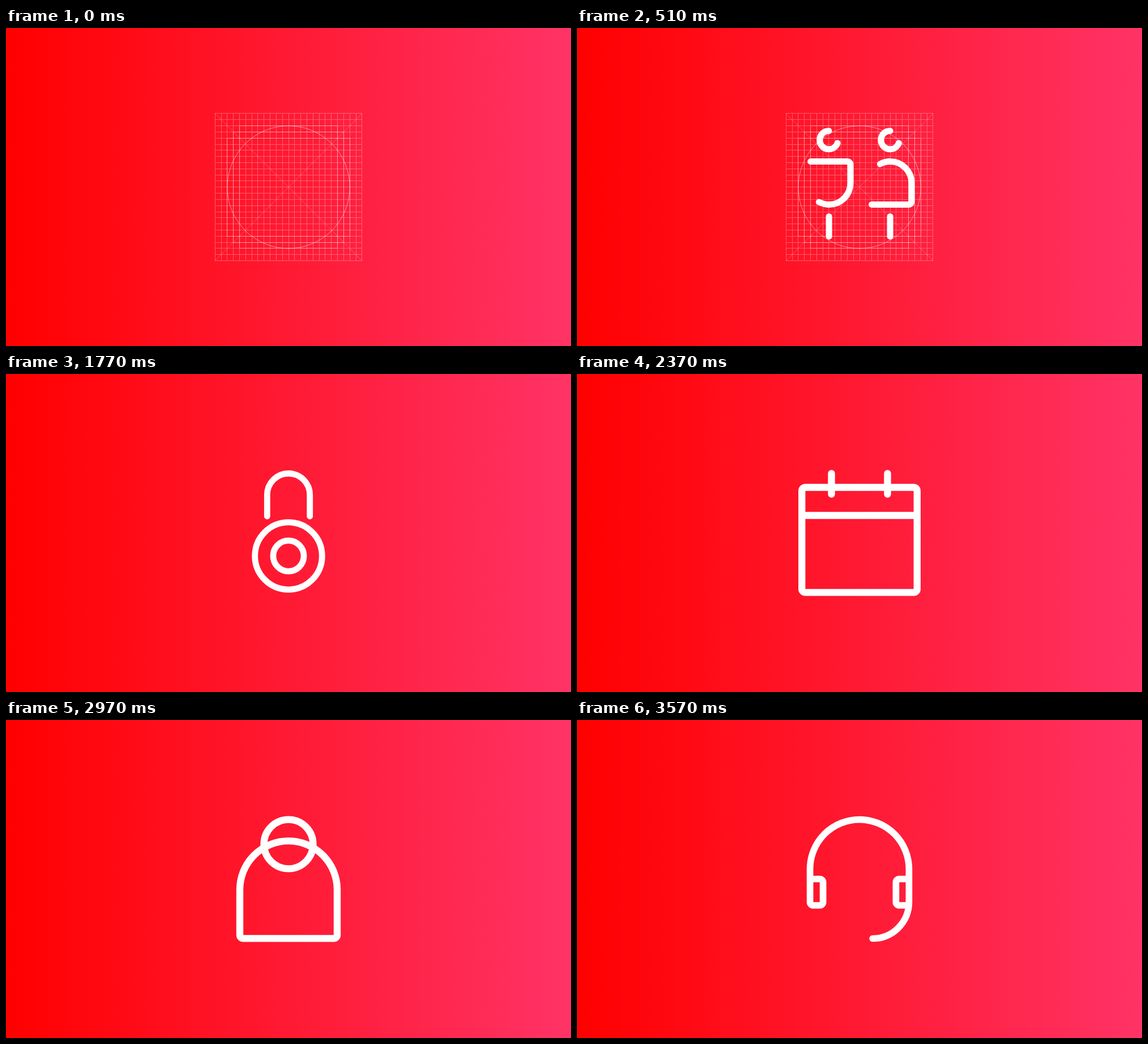
An HTML page for the animation above (3870 ms loop, 998x561 px).

```html
<!DOCTYPE html>
<html lang="en">
<head>
<meta charset="utf-8">
<title>Icon set</title>
<style>
  html, body { margin: 0; width: 100%; height: 100%; overflow: hidden; background: #f00; }
  svg { display: block; width: 100vw; height: 100vh; }
  .icon { fill: none; stroke: #fff; stroke-linecap: round; stroke-linejoin: round; }
  .grid { fill: none; stroke: #fff; stroke-width: 1; }
  .crisp { shape-rendering: crispEdges; }
</style>
</head>
<body>
<svg viewBox="0 0 998 561">
  <defs>
    <linearGradient id="bg">
      <stop offset="0" stop-color="#f00"/>
      <stop offset="1" stop-color="#f36"/>
    </linearGradient>
  </defs>
  <rect width="998" height="561" fill="url(#bg)"/>
  <g id="stage"></g>
</svg>
<script>
const LOOP = 3870, STEP = 30;
const DRAW_START = 300, DRAW_STEPS = 19;
const stage = document.getElementById('stage');

function add(parent, tag, attrs) {
  const el = document.createElementNS('http://www.w3.org/2000/svg', tag);
  for (const key in attrs) el.setAttribute(key, attrs[key]);
  return parent.appendChild(el);
}

const ring = (x, y, r) =>
  `M${x} ${y - r}a${r} ${r} 0 0 0 0 ${2 * r}a${r} ${r} 0 0 0 0 ${-2 * r}`;

const box = (x0, y0, x1, y1, r) =>
  `M${x0 + r} ${y0}H${x1 - r}a${r} ${r} 0 0 1 ${r} ${r}V${y1 - r}` +
  `a${r} ${r} 0 0 1 ${-r} ${r}H${x0 + r}a${r} ${r} 0 0 1 ${-r} ${-r}` +
  `V${y0 + r}a${r} ${r} 0 0 1 ${r} ${-r}`;

// Half-round shape: flat side at y, round side below (dir 1) or above (dir -1).
function cup(x, y, r, c, dir) {
  const sweep = dir > 0 ? 1 : 0, mid = y + dir * r;
  return `M${x - r + c} ${y}H${x + r - c}a${c} ${c} 0 0 ${sweep} ${c} ${dir * c}V${mid}` +
    `A${r} ${r} 0 0 ${sweep} ${x - r} ${mid}V${y + dir * c}` +
    `a${c} ${c} 0 0 ${sweep} ${c} ${-dir * c}`;
}

function buildGrid() {
  const u = 10.82, x0 = 369.2, y0 = 150.9;
  const X = n => x0 + n * u, Y = n => y0 + n * u;
  const g = add(stage, 'g', { class: 'grid' });
  let lines = '';
  for (let i = 0; i <= 24; i++)
    lines += `M${X(i)} ${Y(0)}V${Y(24)}M${X(0)} ${Y(i)}H${X(24)}`;
  add(g, 'path', { d: lines, class: 'crisp', opacity: 0.3 });
  add(g, 'path', {
    d: `M${X(0)} ${Y(0)}L${X(24)} ${Y(24)}M${X(24)} ${Y(0)}L${X(0)} ${Y(24)}`,
    opacity: 0.25
  });
  for (const [a, b] of [[2, 4], [3, 3], [4, 2]])
    add(g, 'rect', {
      x: X(a), y: Y(b), width: u * (24 - 2 * a), height: u * (24 - 2 * b),
      class: 'crisp', opacity: 0.36
    });
  add(g, 'circle', { cx: X(12), cy: Y(12), r: 10 * u, opacity: 0.5 });
  return g;
}

function buildIcon(width, ...paths) {
  const g = add(stage, 'g', { class: 'icon', 'stroke-width': width });
  paths.forEach(d => add(g, 'path', { d }));
  return g;
}

const grid = buildGrid();

const people = buildIcon(11,
  ring(444.9, 197.6, 16.2), ring(553.1, 197.6, 16.2),
  cup(445.1, 235.6, 37.9, 5.4, 1), cup(553.1, 311.4, 37.9, 5.4, -1),
  'M445.1 332.5V383.5', 'M553.1 332.5V383.5');

const lock = buildIcon(10.8,
  'M461.3 251V213.2a37.7 37.7 0 0 1 75.4 0V251',
  ring(499, 321, 59.3), ring(499, 321, 27.1));

const page = buildIcon(12.4,
  box(417.2, 175.4, 580.8, 385.4, 6),
  'M454 225H544M454 274.5H544M454 324H510');

const calendar = buildIcon(12.4,
  box(397.2, 200, 600.8, 385.4, 6),
  'M397.2 249.5H600.8M449.5 175.4V212M548.5 175.4V212');

const house = buildIcon(12.4,
  'M377.5 286.5L481.3 182.7A25 25 0 0 1 516.7 182.7L620.5 286.5',
  'M418.8 286.5V379.4a6 6 0 0 0 6 6H573.2a6 6 0 0 0 6 -6V286.5',
  cup(499, 286.6, 31, 6, 1));

const person = buildIcon(12.4,
  ring(499, 219, 43.4), cup(499, 385.4, 86, 6, -1));

const gift = buildIcon(12.3,
  box(406.3, 224.9, 591.7, 385.4, 6),
  'M499 225V385M431 274.2H591.7',
  'M449.5 175.4L499 224.9L548.5 175.4');

const headset = buildIcon(11.7,
  'M411.6 280.5V263a87.4 87.4 0 0 1 174.8 0V321.6A64.3 64.3 0 0 1 522.2 385.5',
  'M411.6 280.5H428.8a5.8 5.8 0 0 1 5.8 5.8V321.2a5.8 5.8 0 0 1 -5.8 5.8H417.4' +
  'a5.8 5.8 0 0 1 -5.8 -5.8V280.5',
  'M586.4 280.5H569.2a5.8 5.8 0 0 0 -5.8 5.8V321.2a5.8 5.8 0 0 0 5.8 5.8H586');

const strokes = [...people.children].map(el => ({ el, len: el.getTotalLength() }));

const scenes = [
  [0, grid, people], [1770, lock], [2070, page], [2370, calendar],
  [2670, house], [2970, person], [3270, gift], [3570, headset]
];

function drawPeople(t) {
  const x = Math.min(1, Math.max(0, Math.floor((t - DRAW_START) / STEP) / DRAW_STEPS));
  const p = 1 - Math.pow(1 - x, 2.55);
  people.style.visibility = p > 0 ? 'visible' : 'hidden';
  for (const { el, len } of strokes)
    el.style.strokeDasharray = p < 1 ? `${len * p} ${len * 2}` : 'none';
}

function render(ms) {
  const t = ms % LOOP;
  scenes.forEach(([from, ...parts], i) => {
    const to = i + 1 < scenes.length ? scenes[i + 1][0] : LOOP;
    parts.forEach(el => el.style.display = t >= from && t < to ? '' : 'none');
  });
  drawPeople(t);
}

const start = performance.now();
function tick() {
  render(performance.now() - start);
  requestAnimationFrame(tick);
}
tick();
</script>
</body>
</html>
```
